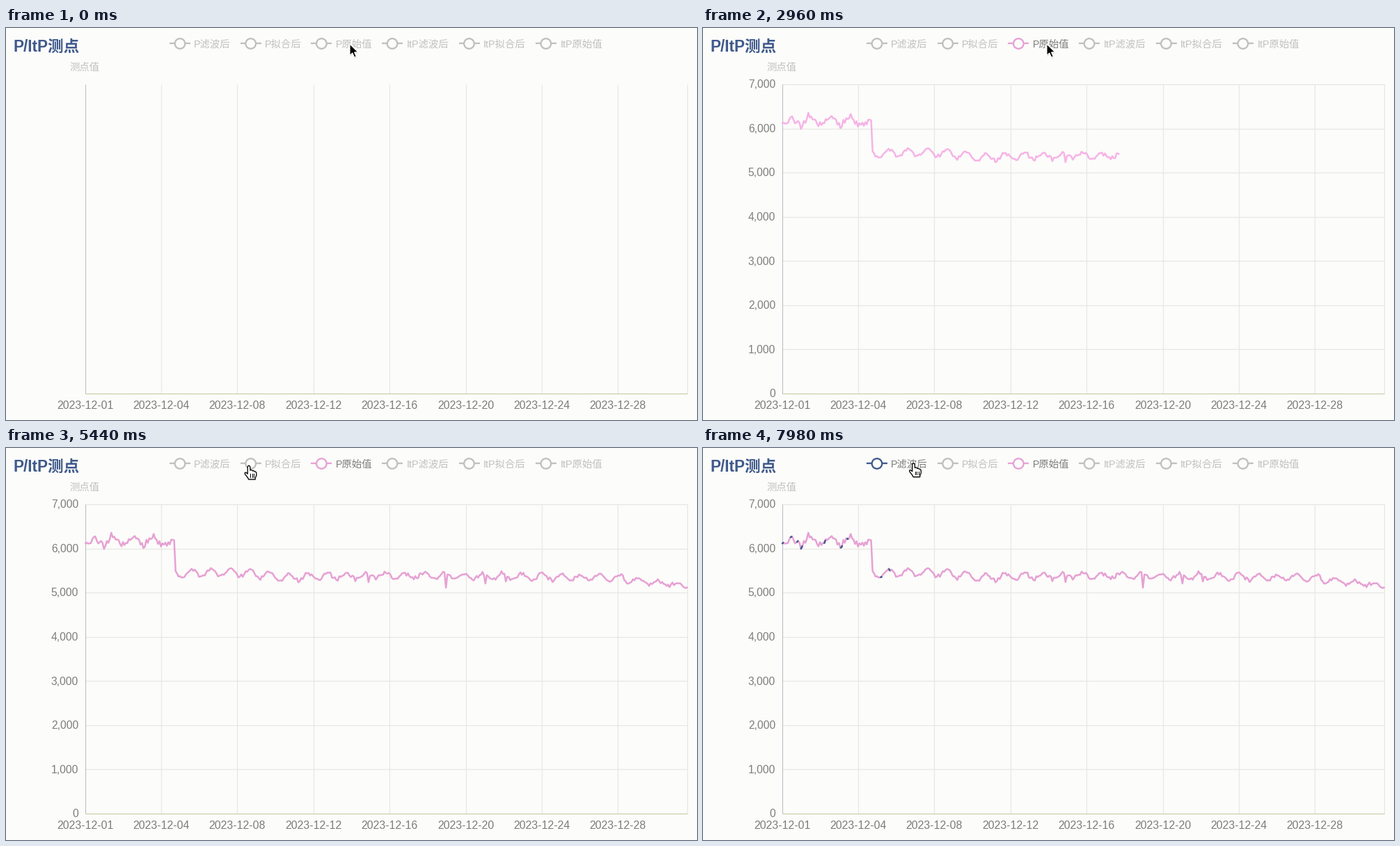
Recreate the animation shown at these times as a matplotlib script. Size 993x564 px, loop 8000 ms.

```python
import numpy as np
import matplotlib.pyplot as plt
from matplotlib.animation import FuncAnimation
from matplotlib.patches import Circle, Polygon
from matplotlib.transforms import Affine2D

W, H, DPI = 993, 564, 72
STEP_MS, LOOP_MS = 20, 8000
LEFT, RIGHT, TOP, BOTTOM = 113.5, 979, 81, 526
DROP, DAY = 242, 27.9            # x of the sudden fall, width of one daily wave
CLICK_RAW, CLICK_FILTERED = 0, 129
SPEED = 14.47                    # pixels uncovered per screen update

BG = "#fcfcfa"
GRID, OFF, TEXT = "#e7e7e2", "#c0c0bd", "#7d7d7d"
BLUE, PINK, PINK_HOT = "#3f5a8b", "#e6a1d4", "#f6b3e6"
FONTS = ["Liberation Sans", "Noto Sans CJK JP"]

fig = plt.figure(figsize=((W + .01) / DPI, (H + .01) / DPI), dpi=DPI, facecolor=BG)
ax = fig.add_axes([0, 0, 1, 1])
ax.set_xlim(0, W)
ax.set_ylim(H, 0)
ax.axis("off")


def rule(x0, y0, x1, y1, color=GRID, lw=1.2, z=1):
    return ax.plot([x0, x1], [y0, y1], color=color, lw=lw, zorder=z,
                   solid_capstyle="butt")[0]


def label(x, y, s, size, color, ha="left", weight="normal"):
    return ax.text(x, y, s, fontsize=size, color=color, ha=ha, va="baseline",
                   family=FONTS, weight=weight, zorder=3)


def build_curve():
    """Slow trend, daily wave and jitter, with one fall and a few glitches."""
    rng = np.random.default_rng(5)
    x = np.append(np.arange(LEFT, RIGHT, 2.1), RIGHT)
    before = x < DROP
    trend = np.interp(x, [DROP, 340, 400, 540, 800, 870, RIGHT],
                      [181, 179, 186, 183, 186, 187, 198])
    swing = np.interp(x, [300, 560, 860, RIGHT], [5.5, 4, 5, 2.5])
    wave = np.cos(2 * np.pi * (x - 295) / DAY)
    y = np.where(before, 135, trend) - swing * wave
    y += rng.normal(0, 1, x.size) * np.where(before, 3, 1.5)
    for gx, gy in ((152, 122), (521, 193), (632, 201), (688, 195), (719, 192)):
        y[np.argmin(abs(x - gx))] = gy
    return x, y


def reveal(x, y, edge):
    keep = x <= edge
    if keep.all():
        return x, y
    return np.append(x[keep], edge), np.append(y[keep], np.interp(edge, x, y))


class LegendItem:
    def __init__(self, cx, text):
        self.bar = rule(cx - 15, 22.5, cx + 15, 22.5, OFF, 2.3, 2)
        self.ring = Circle((cx, 22.5), 7.3, fc=BG, ec=OFF, lw=2.3, zorder=3)
        ax.add_patch(self.ring)
        self.text = label(cx + 20.3, 27.8, text, 14.4, OFF)

    def set(self, on, color):
        self.bar.set_color(color if on else OFF)
        self.ring.set_edgecolor(color if on else OFF)
        self.text.set_color(TEXT if on else OFF)


label(10, 33.4, "P/ItP测点", 22.6, BLUE, weight="bold")
label(113, 61, "测点值", 14.4, OFF, "center")

# Vertical grid, dates and frame
for i in range(8):
    x = LEFT + 109.4 * i
    if i:
        rule(x, TOP, x, BOTTOM)
    label(x, 548.3, f"2023-12-{max(1, 4 * i):02d}", 15.9, TEXT, "center")
rule(RIGHT, TOP, RIGHT, BOTTOM)
rule(LEFT, TOP, LEFT, BOTTOM + .5, "#bebdca", 1.1, 2)
rule(LEFT, BOTTOM, RIGHT, BOTTOM, "#cbcda8", 1.2, 2)

# Value axis, shown once a series is on
scale = []
for k in range(8):
    y = BOTTOM - k * (BOTTOM - TOP) / 7
    scale.append(label(104, y + 5.3, f"{k * 1000:,}", 15.6, TEXT, "right"))
    if k:
        scale.append(rule(LEFT, y, RIGHT, y))

legend, x = [], 250
for name, width in (("P", 101.7), ("ItP", 110.4)):
    for kind in ("滤波后", "拟合后", "原始值"):
        legend.append(LegendItem(x, name + kind))
        x += width

# The filtered curve peeks out from the raw one in short random stretches
cx, cy = build_curve()
fx = np.arange(LEFT, RIGHT, .5)
fy = np.interp(fx, cx, cy)
shows = np.random.default_rng(3).random(400) < .17
fy[~shows[((fx - LEFT) // 3).astype(int)]] = np.nan

style = dict(lw=2.5, solid_joinstyle="round", solid_capstyle="butt")
raw, = ax.plot([], [], color=PINK, zorder=4, **style)
filtered, = ax.plot([], [], color=BLUE, zorder=5, **style)

# Mouse pointers, drawn around their hot spot
place = Affine2D()
move = place + ax.transData


def shape(points, fc, ec, lw):
    """Filled outline with a faint shadow below it."""
    pts = np.array(points)
    shadow = Polygon(pts + (.5, 1.5), fc="black", lw=0, alpha=.18,
                     transform=move, zorder=8)
    body = Polygon(pts, fc=fc, ec=ec, lw=lw, joinstyle="round",
                   transform=move, zorder=9)
    return [ax.add_patch(shadow), ax.add_patch(body)]


arrow = shape([(0, 0), (0, 16.5), (3.8, 13), (6.6, 19.2), (9.4, 18), (6.7, 12),
               (11.8, 11.6)], "black", "white", 1.2)
hand = shape([(-1.7, 1), (0, -.3), (1.7, 1), (2, 6.6), (3.2, 6), (4.8, 6.6),
              (5.4, 7.5), (7, 7.1), (8.2, 8.5), (9.5, 8.4), (10.8, 10), (10.8, 14),
              (9.4, 17), (9.2, 19.6), (-.5, 19.6), (-1.5, 17.3), (-5.6, 12),
              (-5.8, 10.2), (-4.2, 9.6), (-1.8, 11.8)], "white", "black", 1.3)
for x in (2.2, 4.7, 7.2):
    hand += ax.plot([x, x], [12, 16.2], color="black", lw=1, transform=move, zorder=10)

# Pointer stops: update count, x, y
PATH = np.array([(62, 494, 23), (65, 490, 23), (80, 357, 25.5), (87, 349, 25.5),
                 (93, 349, 25.5), (99, 310.5, 25.5), (106, 302.5, 22)]).T


def tick(ms):
    """Screen updates come in threes, 20, 20 and 100 ms apart."""
    q, r = divmod(ms - 1380, 140)
    return 3 * q + min(r // 20, 2)


def edge(n, click):
    return LEFT + max(0, n - click - 1.5) * SPEED


def update(i):
    n = tick(i * STEP_MS)
    raw_on, filtered_on = n >= CLICK_RAW, n >= CLICK_FILTERED
    px, py = (np.interp(n, PATH[0], row) for row in PATH[1:])

    for a in scale:
        a.set_visible(raw_on)
    legend[2].set(raw_on, PINK)
    legend[0].set(filtered_on, BLUE)

    raw.set_data(*reveal(cx, cy, edge(n, CLICK_RAW)))
    raw.set_color(PINK_HOT if px > 438 else PINK)
    raw.set_visible(n > CLICK_RAW + 1)

    seen = fx <= edge(n, CLICK_FILTERED)
    filtered.set_data(fx[seen], fy[seen])
    filtered.set_visible(filtered_on)

    place.clear().translate(px, py)
    is_hand = n > 67
    for p in arrow:
        p.set_visible(not is_hand)
    for p in hand:
        p.set_visible(is_hand)
    return [raw, filtered]


anim = FuncAnimation(fig, update, frames=LOOP_MS // STEP_MS, interval=STEP_MS,
                     repeat=True, repeat_delay=0, blit=False)
plt.show()
```
